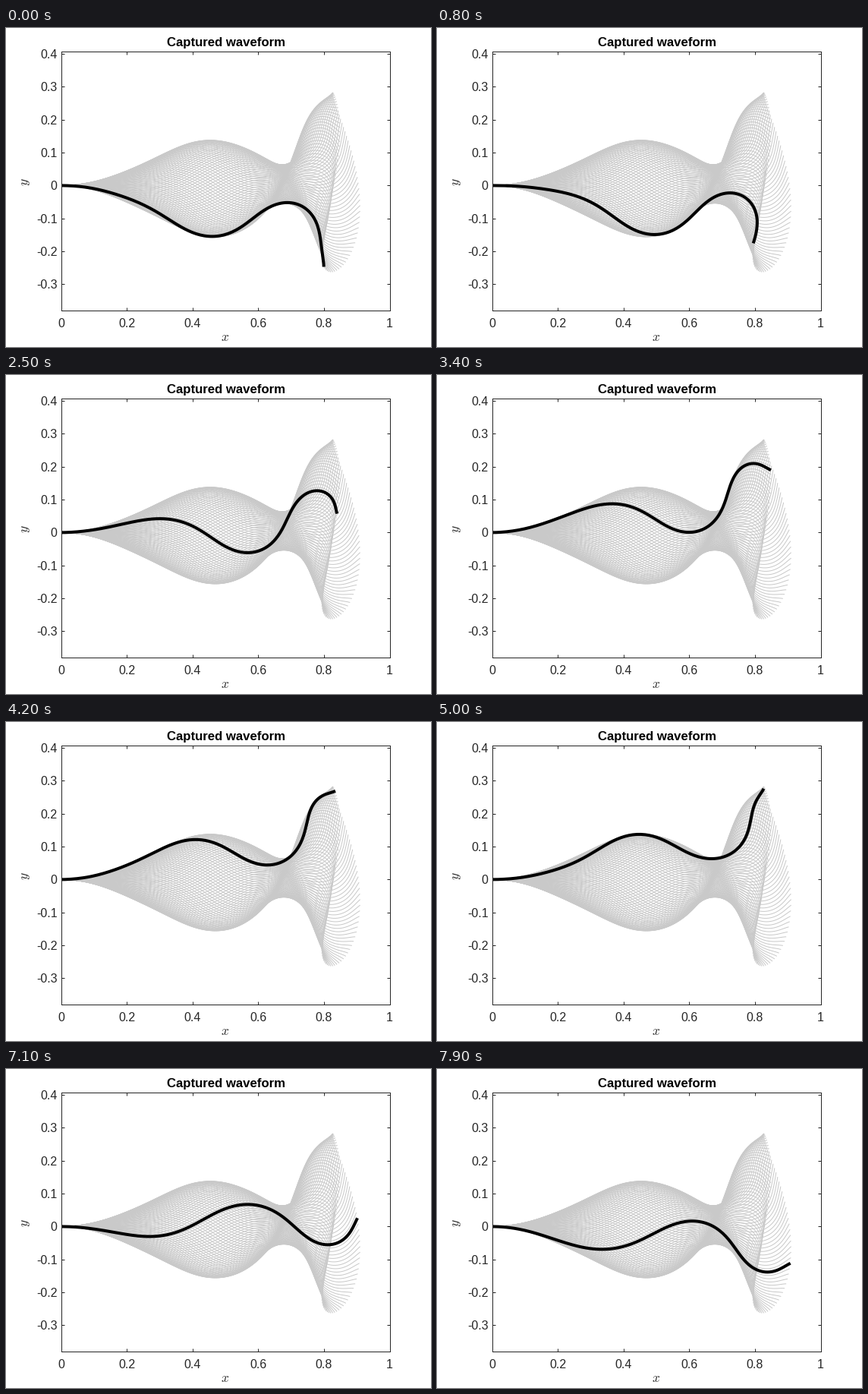
Animation of 560 by 420 pixels, one loop 8000 ms. Source, as a matplotlib script:

```python
import numpy as np
import matplotlib.pyplot as plt
from matplotlib.animation import FuncAnimation
from matplotlib.collections import LineCollection
from numpy.polynomial.legendre import legvander

W, H, DPI = 560, 420, 100
FRAMES, BEAT = 80, 100      # frames shown, frames in a full beat
N = 160                     # segments along the filament
INK = "#262626"
PT = 72 / DPI               # points per pixel

plt.rcParams["font.family"] = "Liberation Sans"
plt.rcParams["mathtext.fontset"] = "cm"

# Four key shapes of the beat: step -> a few points along the filament
KEYS = {
    0: [(.2, -.035), (.32, -.094), (.457, -.154), (.6, -.09), (.7, -.05),
        (.76, -.075), (.795, -.145), (.81, -.24)],
    34: [(.2, .038), (.375, .082), (.5, .036), (.595, -.002), (.66, .021),
         (.705, .07), (.742, .15), (.805, .2), (.865, .177)],
    50: [(.2, .038), (.32, .096), (.45, .147), (.57, .094), (.665, .065),
         (.725, .083), (.759, .14), (.772, .23), (.8, .29)],
    71: [(.15, -.018), (.28, -.035), (.45, .025), (.57, .067), (.65, .043),
         (.75, -.04), (.81, -.068), (.86, -.045), (.896, .01)],
}


def spline(pts, samples=800):
    """Cubic spline from the origin: level at the base, free at the tip."""
    p = np.vstack([(0, 0), pts])
    h = np.hypot(*np.diff(p, axis=0).T)
    d = np.diff(p, axis=0) / h[:, None]
    n = len(p)
    a, b = np.zeros((n, n)), np.zeros((n, 2))
    a[0, 0], b[0] = 1, (1, 0)
    for i in range(1, n - 1):
        l, r = 1 / h[i - 1], 1 / h[i]
        a[i, i - 1:i + 2] = l, 2 * (l + r), r
        b[i] = 3 * (d[i - 1] * l + d[i] * r)
    a[-1, -2:], b[-1] = (1, 2), 3 * d[-1]
    m = np.linalg.solve(a, b)

    u = np.r_[0, np.cumsum(h)]
    q = np.linspace(0, u[-1], samples)
    k = np.clip(np.searchsorted(u, q, side="right") - 1, 0, n - 2)
    t, hk = ((q - u[k]) / h[k])[:, None], h[k][:, None]
    return (p[k] * (1 + 2 * t) * (1 - t) ** 2 + m[k] * hk * t * (1 - t) ** 2
            + p[k + 1] * t * t * (3 - 2 * t) + m[k + 1] * hk * t * t * (t - 1))


S = (np.arange(N) + .5) / N


def angles(pts):
    """Tangent angle at even steps of arc length, and the total length."""
    step = np.diff(spline(pts), axis=0)
    ds = np.hypot(*step.T)
    s = (np.cumsum(ds) - ds / 2) / ds.sum()
    theta = np.unwrap(np.arctan2(step[:, 1], step[:, 0]))
    return np.interp(S, s, theta), ds.sum()


def basis(step):
    a = 2 * np.pi * np.asarray(step, float) / BEAT
    return np.stack([np.ones_like(a), np.cos(a), np.sin(a)], axis=-1)


# Tangent angle = mean + one harmonic in time, smooth along the filament
theta, lengths = map(np.array, zip(*map(angles, KEYS.values())))
LENGTH = lengths.mean()
modes = np.linalg.lstsq(basis(list(KEYS)), theta, rcond=None)[0]
poly = legvander(2 * S - 1, 11)
MODES = (poly @ np.linalg.lstsq(poly, modes.T, rcond=None)[0]).T


def wave(step):
    ang = basis(step) @ MODES
    xy = np.cumsum(np.stack([np.cos(ang), np.sin(ang)], axis=-1), axis=0)
    return np.vstack([(0, 0), xy * LENGTH / N])


def label(x, y, s, size, **kw):
    style = dict(ha="center", va="baseline", color=INK) | kw
    fig.text(x / W, 1 - y / H, s, size=size * PT, **style)


fig = plt.figure(figsize=(W / DPI, H / DPI), dpi=DPI, facecolor="white")
ax = fig.add_axes([72.5 / W, 1 - 371.5 / H, 433 / W, 341 / H])
ax.set(xlim=(0, 1), ylim=(-.379, .4085))

xt, yt = np.arange(6) / 5, np.arange(-3, 5) / 10
ax.set_xticks(xt, [f"{v:g}" for v in xt])
ax.set_yticks(yt, [f"{v:g}" for v in yt])
ax.tick_params(direction="in", top=True, right=True, length=4 * PT, width=PT,
               color=INK, labelcolor=INK, labelsize=16 * PT)
ax.tick_params(axis="x", pad=10 * PT)
ax.tick_params(axis="y", pad=5 * PT)
for side in ax.spines.values():
    side.set(color=INK, linewidth=PT)

label(290, 24, "Captured waveform", 16.7, weight="bold", color="black")
label(288.5, 412.5, "$x$", 17.6)
label(25.5, 202.5, "$y$", 17.6, va="center", rotation=90)

ax.add_collection(LineCollection([wave(i) for i in range(BEAT)],
                                 colors="#c9c9c9", linewidths=PT), autolim=False)
line, = ax.plot([], [], color="black", lw=4 * PT, solid_capstyle="butt",
                solid_joinstyle="round", zorder=2.4)


def draw(i):
    line.set_data(*wave(i).T)
    return line,


anim = FuncAnimation(fig, draw, frames=FRAMES, interval=100, repeat=True,
                     repeat_delay=0, blit=False)
plt.show()
```
